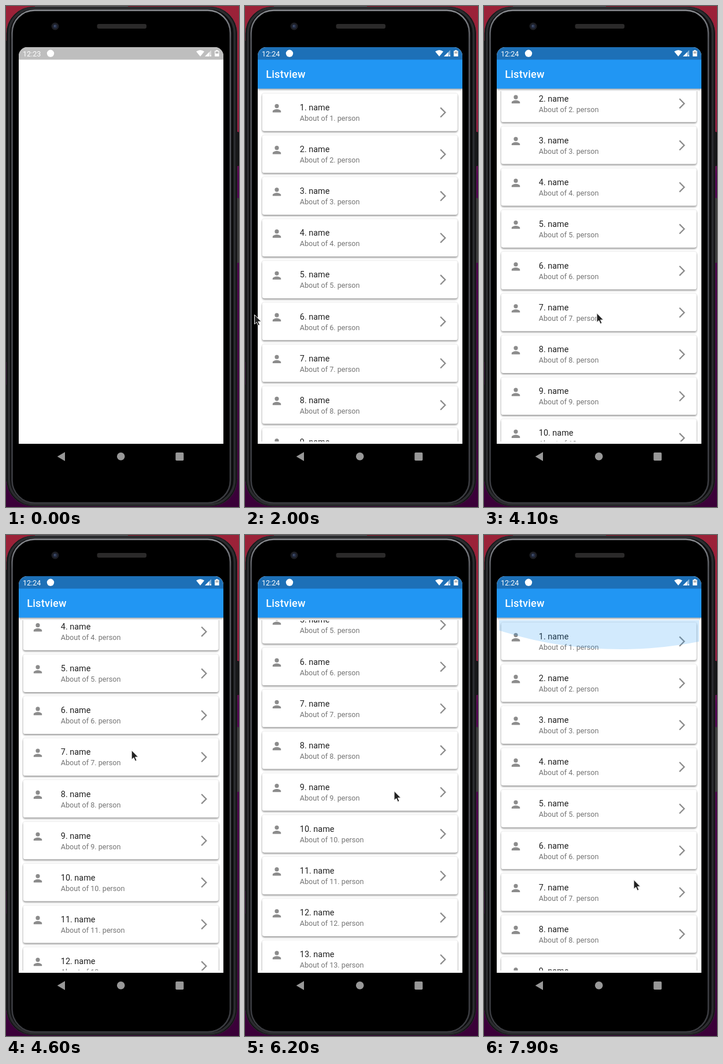
Write an HTML page that moves like this. It is 403 by 864 pixels and loops after 8000 ms.

```html
<!DOCTYPE html>
<html lang="en">
<head>
<meta charset="utf-8">
<title>Scrolling list</title>
<style>
  html, body { margin: 0; width: 100%; height: 100%; overflow: hidden; background: #000; }
  svg { display: block; width: 403px; height: 864px; }
  text { font-family: Roboto, "Noto Sans", sans-serif; }
  .clock { font-size: 12.6px; fill: #fff; }
  .heading { font-size: 18.2px; font-weight: 500; letter-spacing: .2px; fill: #fff; }
  .title { font-size: 14.42px; fill: #212121; }
  .sub { font-size: 12.62px; fill: #757575; }
  .card { fill: #fff; filter: drop-shadow(0 2px 1.5px rgba(0,0,0,.36)) drop-shadow(0 0 1.2px rgba(0,0,0,.16)); }
  .bar { fill: #2196f3; filter: drop-shadow(0 2px 1.5px rgba(0,0,0,.34)); }
</style>
</head>
<body>
<svg viewBox="0 0 403 864">
  <defs>
    <linearGradient id="wall" x2="0" y2="1">
      <stop offset="0" stop-color="#9c2238"/>
      <stop offset=".25" stop-color="#8c1d3e"/>
      <stop offset=".34" stop-color="#520552"/>
      <stop offset="1" stop-color="#3a0038"/>
    </linearGradient>
    <linearGradient id="rim" x2="0" y2="1">
      <stop offset="0" stop-color="#8b8d92"/>
      <stop offset=".06" stop-color="#55575d"/>
      <stop offset=".6" stop-color="#4a4c52"/>
      <stop offset="1" stop-color="#3a3b40"/>
    </linearGradient>
    <clipPath id="screen"><path d="M22 755V86a15 15 0 0 1 15-15H361a15 15 0 0 1 15 15V755z"/></clipPath>
    <clipPath id="view"><rect x="26" y="147" width="346" height="604"/></clipPath>
  </defs>

  <!-- wallpaper and phone body -->
  <rect width="403" height="864" fill="url(#wall)"/>
  <rect x="50" width="161" height="2" fill="#6d6a6e"/>
  <path d="M0 60H2V614H0zM0 653H2V820H0z" fill="#0c0c0e"/>
  <rect x="396" y="217" width="7" height="59" rx="1.5" fill="#111113"/>
  <rect x="396" y="331" width="7" height="112" rx="1.5" fill="#3b3b3b"/>
  <rect x="1" y="1.5" width="398.5" height="861" rx="46" fill="#0b0b0c" stroke="#2a2b2d"/>
  <rect x="5" y="4" width="390.5" height="855.5" rx="43" fill="none" stroke="#2b2c2f" stroke-width="4"/>
  <rect x="10.5" y="7.5" width="377.5" height="849.5" rx="39" fill="#000" stroke="url(#rim)" stroke-width="2.6"/>
  <circle cx="85" cy="35" r="6.5" fill="#1d1e23"/>
  <circle cx="85" cy="35" r="3.5" fill="#262f47"/>
  <circle cx="84.5" cy="34.5" r="1.2" fill="#52617f"/>
  <rect x="157.5" y="31" width="85.5" height="8" rx="3" fill="#2b2a2a"/>
  <g fill="#989898">
    <path d="M88.7 777L102 769.3V784.7z"/>
    <circle cx="198.7" cy="776.7" r="6.8"/>
    <rect x="293.3" y="770" width="14" height="14" rx="1.8"/>
  </g>

  <g clip-path="url(#screen)">
    <rect x="22" y="71" width="354" height="684" fill="#fff"/>
    <rect x="22" y="71" width="354" height="21.5" fill="#bebebe"/>
    <g id="app">
      <rect x="22" y="92" width="354" height="663" fill="#fff"/>
      <rect class="bar" x="22" y="92" width="354" height="50.5"/>
      <rect x="22" y="71" width="354" height="21.5" fill="#1d70b7"/>
      <text class="heading" x="36.2" y="124.3">Listview</text>
      <g clip-path="url(#view)">
        <g id="list"></g>
        <ellipse id="glow" cx="236" rx="519" fill="#2196f3" fill-opacity=".2"/>
      </g>
    </g>
    <text id="clock" class="clock" x="29" y="86.5"></text>
    <g fill="#fff">
      <circle cx="77" cy="81.8" r="6.2"/>
      <path d="M329 78.6Q336 73.2 343 78.6L336 87z"/>
      <path d="M355 76V87H344z" fill-opacity=".45"/>
      <path d="M351.5 79.5V87H344zM353.2 84.5H355V87H353.2z"/>
      <path d="M363.3 76H366.3V77.2H368.6V87H361V77.2H363.3z"/>
    </g>
    <path d="M362.3 78.6H367.3V82H362.3z" fill="#888" fill-opacity=".6"/>
  </g>

  <path id="cursor" d="M.5 .5V16.6L4.2 13.3 6.8 19.2 9.5 18 6.9 12.3H12.1z" fill="#222" stroke="#fff"/>
</svg>

<script>
  const LOOP = 8000, STEP = 100, PITCH = 72.11, CARDS = 20;
  const $ = id => document.getElementById(id);
  const PERSON = 'M12 12a4 4 0 1 0 0-8 4 4 0 0 0 0 8zm0 2c-2.67 0-8 1.34-8 4v2h16v-2c0-2.66-5.33-4-8-4z';
  const CHEVRON = 'M6.23 20.23L8 22 18 12 8 2 6.23 3.77 14.46 12z';

  const card = n => `<g transform="translate(0 ${(n - 1) * PITCH})">
    <rect class="card" x="29.7" y="150.8" width="338" height="64.9" rx="3.6"/>
    <path d="${PERSON}" transform="translate(44.2 165.4) scale(.9)" fill="#8c8c8c"/>
    <text class="title" x="94.8" y="180">${n}. name</text>
    <text class="sub" x="94.8" y="198">About of ${n}. person</text>
    <path d="${CHEVRON}" transform="translate(331.7 172.8) scale(.9)" fill="#8c8c8c"/>
  </g>`;
  $('list').innerHTML = Array.from({ length: CARDS }, (_, i) => card(i + 1)).join('');

  // Key poses of the drags: time, scroll, pointer x, pointer y
  const poses = [
    [2000, 0, 16, 532],
    [3000, 0, 182, 646],
    [3200, 0, 182, 646],
    [3600, 30, 184.5, 593],
    [4100, 87.5, 194.5, 529],
    [5200, 427, 241.5, 205],
    [5600, 490, 246, 190],
    [5800, 490, 248, 230],
    [6200, 317, 257.5, 441],
    [7500, 0, 258, 575],
    [7900, 0, 258.5, 594],
  ];

  const ramp = (t, from, to) => Math.min(1, Math.max(0, (t - from) / (to - from)));
  const slope = (i, c) => (poses[i + 1][c] - poses[i][c]) / (poses[i + 1][0] - poses[i][0]);

  // Speed at a pose: harmonic mean of both sides, so that turns and stops are smooth
  function speed(i, c) {
    if (i === 0) return slope(0, c);
    if (i === poses.length - 1) return slope(i - 1, c);
    const a = slope(i - 1, c), b = slope(i, c);
    return a * b > 0 ? 2 * a * b / (a + b) : 0;
  }

  function pose(t, c) {
    const last = poses.length - 1;
    const i = Math.max(0, Math.min(last, poses.findIndex(p => p[0] > t) < 0 ? last : poses.findIndex(p => p[0] > t)) - 1);
    const [a, b] = [poses[i], poses[i + 1]];
    const span = b[0] - a[0], k = ramp(t, a[0], b[0]), r = 1 - k;
    return r * r * (1 + 2 * k) * a[c] + k * k * (3 - 2 * k) * b[c]
      + span * k * r * (r * speed(i, c) - k * speed(i + 1, c));
  }

  function draw(t) {
    $('clock').textContent = t < 400 ? '12:23' : '12:24';
    $('app').setAttribute('opacity', ramp(t, 1100, 1600));
    $('list').setAttribute('transform', `translate(0 ${-pose(t, 1)})`);
    $('cursor').setAttribute('transform', `translate(${pose(t, 2)} ${pose(t, 3)})`);
    $('cursor').setAttribute('visibility', t < 2000 ? 'hidden' : 'visible');
    const depth = 50 * ramp(t, 7500, 7900), ry = depth * 7.6;
    $('glow').setAttribute('ry', ry);
    $('glow').setAttribute('cy', 147 + depth - ry);
  }

  function tick() {
    draw(Math.floor(performance.now() % LOOP / STEP) * STEP);
    requestAnimationFrame(tick);
  }
  tick();
</script>
</body>
</html>
```
